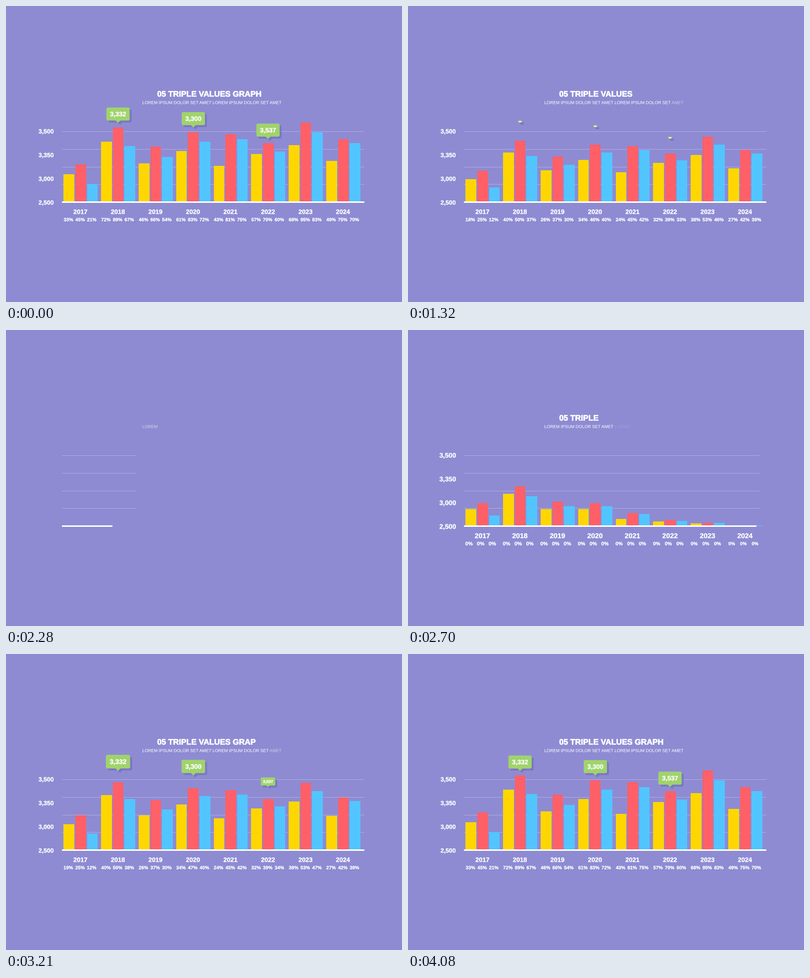
Recreate the animation shown at these times as a matplotlib script. Size 800 by 600 pixels, loop 4110 ms.

```python
import numpy as np
import matplotlib.pyplot as plt
from matplotlib.animation import FuncAnimation
from matplotlib.patches import FancyBboxPatch, PathPatch
from matplotlib.path import Path
from matplotlib.textpath import TextPath
from matplotlib.transforms import Affine2D

W, H, DPI = 800, 600, 100
STEP, FRAMES = 30, 137
PX = 72 / DPI

BG, GREEN, SHADE = "#8e8bd3", "#a0d36c", "#6d6abb"

TITLE = "05 TRIPLE VALUES GRAPH"
WORDS = ("LOREM IPSUM DOLOR SET AMET " * 2).split()
AXIS = ("3,500", "3,350", "3,000", "2,500")
SHARES = ((33, 45, 21), (72, 89, 67), (46, 66, 54), (61, 83, 72),
          (43, 81, 75), (57, 70, 60), (68, 95, 83), (49, 75, 70))
CALLOUTS = (("3,332", 226.3, 237), ("3,300", 378.4, 246.3), ("3,537", 529.3, 269.6))

# Growth of a bar: quick rise, then a long settling.
GROW_MS = (0, 11, 47, 83, 119, 155, 191, 227, 263, 330, 410, 521, 629, 773, 1000, 1250)
GROW = (0, .007, .04, .098, .19, .325, .44, .53, .6, .69, .765, .832, .882, .922, .975, 1)

OUT_END = 2190  # the chart leaves before this time and returns after it
LEFT, RIGHT, BASE = 113, 724, 397.5
GROUP, BAR, BAR_W = 75.8, 23.6, 21.7

fig = plt.figure(figsize=(W / DPI, H / DPI), dpi=DPI, facecolor=BG)
ax = fig.add_axes([0, 0, 1, 1])
ax.set_xlim(0, W)
ax.set_ylim(H, 0)
ax.axis("off")


class Layer:
    """All shapes of one style, drawn as a single compound path."""

    def __init__(self, color, alpha=1, stroke=0):
        self.paths = []
        self.patch = PathPatch(Path([(0, 0), (0, 0)]), fc=color, alpha=alpha,
                               ec=color if stroke else "none", lw=stroke * PX)
        ax.add_artist(self.patch)

    def add(self, path):
        self.paths.append(path)

    def flush(self):
        self.patch.set_visible(bool(self.paths))
        if self.paths:
            self.patch.set_path(Path.make_compound_path(*self.paths))
        self.paths = []


# Back to front
grid = Layer("white", 0.3)
bars = [Layer(c) for c in ("#ffd600", "#ff6068", "#52c5ff")]
axis_line = Layer("white")
label_shade = Layer(SHADE, 0.3)
bubble_shade = Layer(SHADE, 0.6)
bubbles = Layer(GREEN)
title = Layer("white", stroke=0.7)
subtitle = Layer("white")
fading = Layer("white")
labels = Layer("white", stroke=0.35)
layers = [grid, *bars, axis_line, label_shade, bubble_shade, bubbles,
          title, subtitle, fading, labels]

glyphs = {}


def clamp(u):
    return min(max(u, 0), 1)


def smooth(u):
    u = clamp(u)
    return u * u * (3 - 2 * u)


def ease_out(u):
    return 1 - (1 - clamp(u)) ** 3


def pop(u, peak=1.1):
    if u < 0.5:
        return peak * smooth(2 * u)
    return peak - (peak - 1) * smooth(2 * u - 1)


def glyph_path(s, size, weight="bold"):
    key = s, size, weight
    if key not in glyphs:
        path = TextPath((0, 0), s, size=size,
                        prop={"family": "Liberation Sans", "weight": weight})
        glyphs[key] = path, path.get_extents()
    return glyphs[key]


def text(layer, s, x, y, size, scale=1, align=0.0, pivot=0, weight="bold"):
    """Text centred on y; it scales around x + pivot."""
    if not s.strip() or scale < 0.01:
        return
    path, box = glyph_path(s, size, weight)
    anchor = box.x0 + align * box.width
    move = (Affine2D().translate(-anchor - pivot, -0.35 * size)
            .scale(scale, -scale).translate(x + pivot, y))
    layer.add(path.transformed(move))


def rect(layer, x, y, w, h):
    if w > 0 and h > 0:
        layer.add(Path([(x, y), (x + w, y), (x + w, y + h), (x, y + h), (x, y)],
                       closed=True))


def bubble(layer, x, y, s):
    box = FancyBboxPatch((x - 23.5 * s, y - 31.3 * s), 47 * s, 26.5 * s,
                         boxstyle=f"round,pad=0,rounding_size={3 * s}")
    layer.add(box.get_path())
    top = y - 5.2 * s
    layer.add(Path([(x - 5 * s, top), (x + 5 * s, top), (x, y), (x - 5 * s, top)],
                   closed=True))


def draw_heading(t, leaving):
    if leaving:
        count = int(np.ceil((2120 - t) / 47.5))
        shown = np.interp(t, (1200, 1320, 1740, 1950, 2160), (10, 9.55, 7.5, 4.4, 0))
    else:
        count = int((t - 2295) / 43)
        shown = np.interp(t, (2220, 2700, 3210, 3300), (0, 5.15, 9.55, 10))
    text(title, TITLE[:max(count, 0)], 306, 178, 16.1)

    start = glyph_path(WORDS[0], 8.7, "normal")[1].x0
    for k, word in enumerate(WORDS):
        alpha = clamp(shown - k)
        if alpha <= 0:
            break
        layer = subtitle if alpha == 1 else fading
        line = glyph_path(" ".join(WORDS[:k + 1]), 8.7, "normal")[1]
        text(layer, word, 276 + line.x1 - start, 195.7, 8.7, align=1, weight="normal")
        if layer is fading:
            fading.patch.set_alpha(alpha)


def draw_lines(t, leaving):
    if leaving:
        thin = 1 - clamp((t - 1453) / 707) ** 3
        thick = 1 - clamp((t - 1497) / 663) ** 3
    else:
        thin = ease_out((t - 2220) / 670)
        thick = ease_out((t - 2240) / 675)
    for y in (254.5, 290.5, 326.5, 361.5):
        rect(grid, LEFT, y - 0.5, (RIGHT - LEFT) * thin, 1)
    rect(axis_line, LEFT, BASE - 1.5, (RIGHT - LEFT) * thick, 3)


def draw_bars(t, leaving):
    for i, shares in enumerate(SHARES):
        ms = (1720 - t) / 0.79 if leaving else t - 2437 - 36 * i
        k = np.interp(ms, GROW_MS, GROW)
        for j, share in enumerate(shares):
            h = 1.693 * share * k
            rect(bars[j], 116.3 + GROUP * i + BAR * j, BASE - 0.5 - h, BAR_W, h)


def draw_labels(t, leaving):
    for i, label in enumerate(AXIS):
        u = (1980 + 60 * i - t) / 400 if leaving else (t - 2360 - 15 * (3 - i)) / 600
        text(labels, label, 96, 254 + 48.1 * i, 12.3, pop(u), align=1, pivot=-6)

    part = smooth((1725 - t) / 753) if leaving else smooth((t - 2670) / 998.7)
    for i, shares in enumerate(SHARES):
        u = (2070 - 13 * i - t) / 600 if leaving else (t - 2350 - 10 * i) / 600
        text(labels, str(2017 + i), 150.3 + GROUP * i, 417, 12.8, pop(u), align=0.5)

        u = (2040 - 17 * i - t) / 600 if leaving else (t - 2400 - 9 * i) / 600
        for j, share in enumerate(shares):
            label = f"{round(share * part)}%"
            x = 116.8 + GROUP * i + BAR * j
            text(label_shade, label, x + 1.5, 435.3, 9.6, pop(u), pivot=7.5)
            text(labels, label, x, 433, 9.6, pop(u), pivot=7.5)


def draw_callouts(t, leaving):
    for i, (label, x, y) in enumerate(CALLOUTS):
        s = pop((1380 - t) / 500 if leaving else (t - 2842 - 100 * i) / 600, 1.05)
        if s < 0.01:
            continue
        bubble(bubble_shade, x + 4, y + 4, s)
        bubble(bubbles, x, y, s)
        text(labels, label, x, y - 18 * s, 13, s, align=0.5)


def draw(frame):
    t = frame * STEP
    leaving = t < OUT_END
    for part in (draw_heading, draw_lines, draw_bars, draw_labels, draw_callouts):
        part(t, leaving)
    for layer in layers:
        layer.flush()
    return [layer.patch for layer in layers]


anim = FuncAnimation(fig, draw, frames=FRAMES, interval=STEP,
                     init_func=lambda: [], repeat=True, repeat_delay=0)
plt.show()
```
